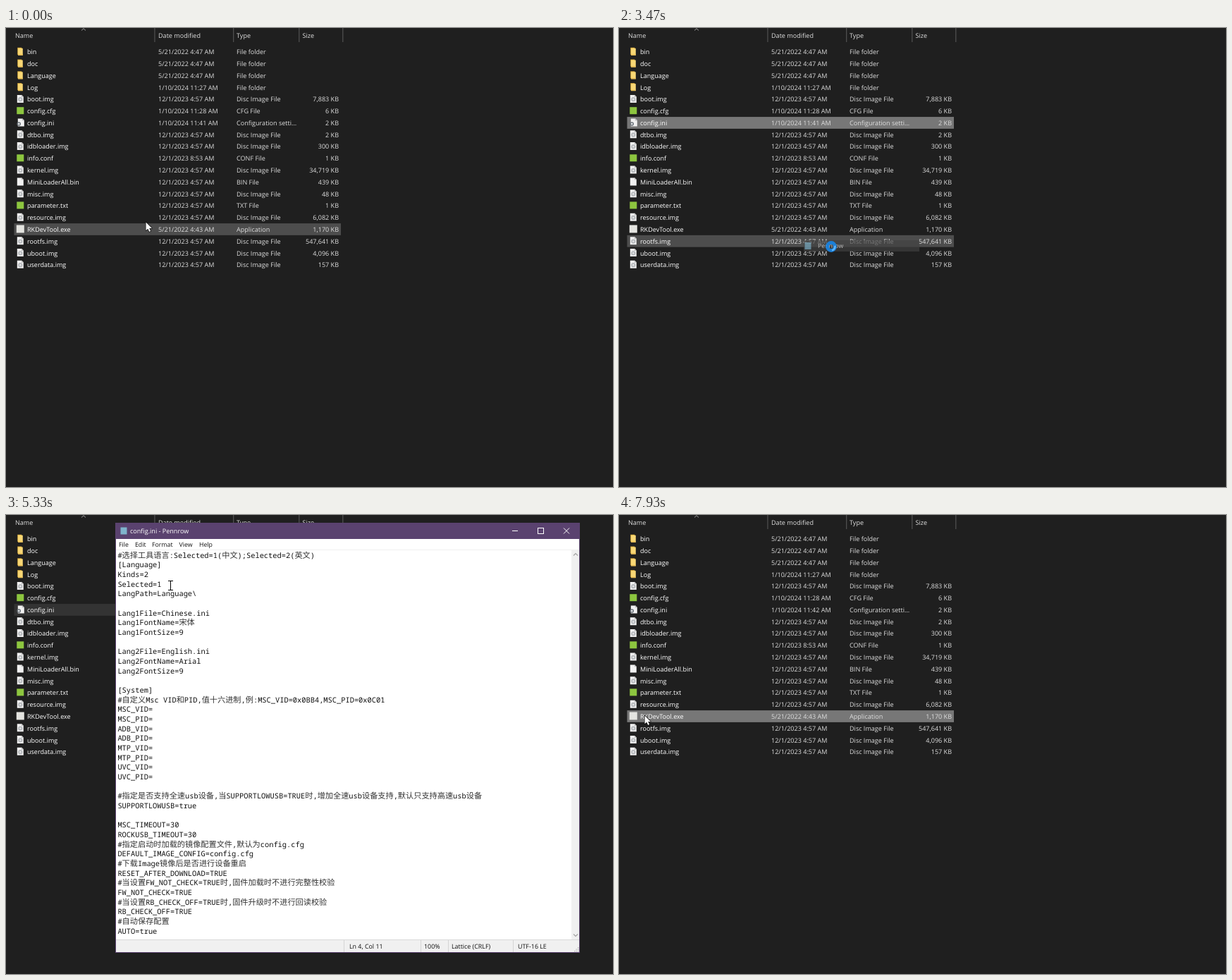
Animation, 861 px wide and 651 px high, one loop 8 s. Source, as an HTML page with a canvas:

```html
<!DOCTYPE html>
<html lang="en">
<head>
<meta charset="utf-8">
<title>Editing config.ini</title>
<style>
html, body { margin: 0; width: 100%; height: 100%; overflow: hidden; background: #1f1f1f; }
canvas { display: block; }
</style>
</head>
<body>
<canvas id="stage" width="861" height="651"></canvas>
<script>
const ctx = document.getElementById('stage').getContext('2d');
const UI = '"Open Sans", "Noto Sans", sans-serif';
const MONO = '"Noto Sans Mono", "DejaVu Sans Mono", monospace';
const CJK = '"Noto Sans CJK SC", "Noto Sans CJK", sans-serif';
const LOOP = 8000, FPS = 15;
const ROW_TOP = 25.4, ROW_H = 16.78, CONFIG = 6, TOOL = 15;
const WIN = { x: 155, y: 11, w: 659, h: 610 };

// name | type | size | icon | date (default: BUILD)
const BUILD = '12/1/2023 4:57 AM', SETUP = '5/21/2022 4:47 AM';
const FILES = `bin|File folder||folder|${SETUP}
doc|File folder||folder|${SETUP}
Language|File folder||folder|${SETUP}
Log|File folder||folder|1/10/2024 11:27 AM
boot.img|Disc Image File|7,883 KB|disc
config.cfg|CFG File|6 KB|note|1/10/2024 11:28 AM
config.ini|Configuration setti...|2 KB|gear|1/10/2024 11:41 AM
dtbo.img|Disc Image File|2 KB|disc
idbloader.img|Disc Image File|300 KB|disc
info.conf|CONF File|1 KB|note|12/1/2023 8:53 AM
kernel.img|Disc Image File|34,719 KB|disc
MiniLoaderAll.bin|BIN File|439 KB|page
misc.img|Disc Image File|48 KB|disc
parameter.txt|TXT File|1 KB|note
resource.img|Disc Image File|6,082 KB|disc
RKDevTool.exe|Application|1,170 KB|tool|5/21/2022 4:43 AM
rootfs.img|Disc Image File|547,641 KB|disc
uboot.img|Disc Image File|4,096 KB|disc
userdata.img|Disc Image File|157 KB|disc`.split('\n').map(s => s.split('|'));

// label | centre y | icon | has submenu
const MENU = `Open|145
Print|160
Edit|174.5
Shred with MossScrub|190|shred
4-Nib|205.5||1
Convert to Velmo PDF|225.5|pdf
Create and Share Velmo PDF|241.5|pdf
Edit with Pennrow++|261.5|note
Scan with Tarnovell Watchman...|277.5|guard
Share|293|share
Open with|308.5||1
What's using this file?|324|lock
Scan with Gremlinsweep|340|scan
BulkRetitle|356|retitle
Restore previous versions|371.5
Send to|391||1
Cut|410
Copy|425
Create shortcut|444
Delete|459
Rename|474
Properties|493`.split('\n').map(s => s.split('|'));
const MENU_LINES = [215, 251.5, 380.5, 400, 434, 483.5];
const SUBMENU = [['Pennrow', 309], ['Pennrow++', 325], ['Search the Tarnovell Store', 345], ['Choose another app', 360]];

const TEXT = String.raw`#选择工具语言:Selected=1(中文);Selected=2(英文)
[Language]
Kinds=2
Selected=
LangPath=Language\

Lang1File=Chinese.ini
Lang1FontName=宋体
Lang1FontSize=9

Lang2File=English.ini
Lang2FontName=Arial
Lang2FontSize=9

[System]
#自定义Msc VID和PID,值十六进制,例:MSC_VID=0x0BB4,MSC_PID=0x0C01
MSC_VID=
MSC_PID=
ADB_VID=
ADB_PID=
MTP_VID=
MTP_PID=
UVC_VID=
UVC_PID=

#指定是否支持全速usb设备,当SUPPORTLOWUSB=TRUE时,增加全速usb设备支持,默认只支持高速usb设备
SUPPORTLOWUSB=true

MSC_TIMEOUT=30
ROCKUSB_TIMEOUT=30
#指定启动时加载的镜像配置文件,默认为config.cfg
DEFAULT_IMAGE_CONFIG=config.cfg
#下载Image镜像后是否进行设备重启
RESET_AFTER_DOWNLOAD=TRUE
#当设置FW_NOT_CHECK=TRUE时,固件加载时不进行完整性校验
FW_NOT_CHECK=TRUE
#当设置RB_CHECK_OFF=TRUE时,固件升级时不进行回读校验
RB_CHECK_OFF=TRUE
#自动保存配置
AUTO=true`.split('\n');

// pointer path: step, x, y
const PATH = [
  [-1, 199, 281], [0, 198, 275], [3, 168, 238], [7, 88, 146], [10, 74, 135], [18, 74, 135],
  [21, 100, 190], [27, 168, 325], [30, 174, 351], [32, 177, 322], [34, 180, 312], [42, 244, 309],
  [46, 294, 322], [48, 301, 310], [52, 301, 310], [56, 266, 249], [60, 238, 150], [63, 229, 114],
  [66, 229, 98], [73, 229, 98], [74, 233, 99], [87, 233, 99], [91, 520, 60], [95, 764, 27],
  [97, 764, 27], [101, 790, 20], [102, 790, 20], [105, 561, 124], [110, 180, 262],
  [115, 36, 283], [116, 36, 284], [120, 36, 284]
];

function pointer(k) {
  const i = Math.max(1, PATH.findIndex(p => p[0] >= k));
  const [a, ax, ay] = PATH[i - 1], [b, bx, by] = PATH[i];
  const f = (k - a) / (b - a);
  return { x: Math.round(ax + (bx - ax) * f), y: Math.round(ay + (by - ay) * f) };
}

function rect(x, y, w, h, color) {
  ctx.fillStyle = color;
  ctx.fillRect(x, y, w, h);
}

function frame(x, y, w, h, color) {
  ctx.strokeStyle = color;
  ctx.lineWidth = 1;
  ctx.strokeRect(x + .5, y + .5, w - 1, h - 1);
}

function line(color, width, ...pts) {
  ctx.strokeStyle = color;
  ctx.lineWidth = width;
  ctx.beginPath();
  for (let i = 0; i < pts.length; i += 2) ctx.lineTo(pts[i], pts[i + 1]);
  ctx.stroke();
}

function dot(x, y, r, color) {
  ctx.fillStyle = color;
  ctx.beginPath();
  ctx.arc(x, y, r, 0, 7);
  ctx.fill();
}

function ring(x, y, r, width, color, from = 0, to = 7) {
  ctx.strokeStyle = color;
  ctx.lineWidth = width;
  ctx.beginPath();
  ctx.arc(x, y, r, from, to);
  ctx.stroke();
}

// y is the middle of the capitals
function label(s, x, y, size, color, align = 'left', weight = 400) {
  ctx.font = `${weight} ${size}px ${UI}`;
  ctx.textAlign = align;
  ctx.fillStyle = color;
  ctx.fillText(s, x, y + size * .36);
}

function chevron(x, y, color) {
  line(color, 1, x - 1.5, y - 3, x + 1.5, y, x - 1.5, y + 3);
}

function page(x, y) {
  ctx.fillStyle = '#f1f1f1';
  ctx.beginPath();
  ctx.moveTo(x - 4.5, y - 5.5);
  ctx.lineTo(x + 2, y - 5.5);
  ctx.lineTo(x + 4.5, y - 3);
  ctx.lineTo(x + 4.5, y + 5.5);
  ctx.lineTo(x - 4.5, y + 5.5);
  ctx.fill();
  line('#a9a9a9', .8, x + 2, y - 5.5, x + 2, y - 3, x + 4.5, y - 3);
}

const ICONS = {
  folder(x, y) {
    rect(x - 4, y - 5.5, 6, 10, '#e2b23f');
    rect(x - 3.2, y - 4.5, 6.7, 10, '#f8d775');
    rect(x - 3.2, y + 4, 6.7, 1.5, '#e9bd55');
  },
  page,
  disc(x, y) {
    page(x, y);
    dot(x, y + .8, 3.2, '#b9bcbf');
    dot(x, y + .8, 1.1, '#f4f4f4');
  },
  gear(x, y) {
    page(x + 1, y);
    ring(x - 2, y + 2, 2, 1.5, '#6d757c');
  },
  note: (x, y) => rect(x - 5, y - 5, 10, 10, '#8dc63f'),
  tool: (x, y) => rect(x - 5.5, y - 5.5, 11, 11, '#e4e4e0'),
  shred: (x, y) => dot(x, y, 5, '#d8b65a'),
  pdf: (x, y) => rect(x - 4, y - 4.5, 8, 9, '#d9433f'),
  guard: (x, y) => rect(x - 5.5, y - 5.5, 11, 11, '#1581d8'),
  scan: (x, y) => dot(x, y, 5, '#1c62c8'),
  retitle: (x, y) => rect(x - 4.5, y - 4.5, 9, 9, '#1b86d6'),
  share(x, y) {
    line('#e6e6e6', 1, x - 2, y - 2.5, x - 4.5, y - 2.5, x - 4.5, y + 4.5, x + 3.5, y + 4.5, x + 3.5, y + 2);
    line('#e6e6e6', 1, x - 2, y + 2, x - 1, y - 1, x + 1.5, y - 2, x + 1.5, y - 4.5, x + 5, y - 1, x + 1.5, y + 2, x + 1.5, y);
  },
  lock(x, y) {
    ring(x, y - 2, 2.5, 1.3, '#b9b9b9', Math.PI, 6.28);
    rect(x - 4, y - 1, 8, 6, '#c9a24a');
    rect(x - .5, y + 1, 1, 2, '#4b3a18');
  },
  app: (x, y) => rect(x - 4.5, y - 5, 9, 10, '#7fb4cc')
};

function drawList(k) {
  const head = '#dedede';
  label('Name', 13, 10.5, 9.05, head);
  label('Date modified', 216, 10.5, 9.05, head);
  label('Type', 327, 10.5, 9.05, head);
  label('Size', 420.5, 10.5, 9.05, head);
  for (const x of [210.5, 322.3, 415.4, 477.4]) rect(x, 0, .9, 20, '#636363');
  line('#9a9a9a', 1, 107, 3.5, 110, .8, 113, 3.5);

  const focused = k < 53 || k >= 104;
  const selected = k < 13 ? -1 : k < 114 ? CONFIG : TOOL;
  const p = pointer(k - 1);
  const free = k < 18 || k === 51 || k === 52 || k >= 105;
  const hover = free && p.x > 11 && p.x < 475 ? Math.floor((p.y - ROW_TOP) / ROW_H) : -1;

  FILES.forEach(([name, type, size, icon, date = BUILD], i) => {
    const top = ROW_TOP + ROW_H * i, mid = 34 + ROW_H * i;
    if (i === selected) rect(11.5, top, 463.5, ROW_H, focused ? '#777777' : '#333333');
    else if (i === hover) rect(11.5, top, 463.5, ROW_H, '#4d4d4d');
    ICONS[icon](20.3, mid - .7);
    if (i === CONFIG && k >= 109) date = date.replace(':41', ':42');
    label(name, 30, mid, 9.05, '#fff');
    label(date, 216, mid, 9.05, '#dedede');
    label(type, 327, mid, 9.05, '#dedede');
    label(size, 472, mid, 9.05, '#dedede', 'right');
  });
}

function panel(x, y, w, h) {
  rect(x - 1, y - .5, w + 2, h + 1, 'rgba(0,0,0,.2)');
  rect(x, y, w, h, '#2b2b2b');
  frame(x, y, w, h, '#858585');
}

function drawMenu(k) {
  const p = pointer(k), inSub = k >= 44;
  ctx.globalAlpha = k === 18 ? .6 : 1;
  panel(74, 135, 188, 367);
  MENU.forEach(([text, ys, icon, sub], i) => {
    const y = +ys;
    const lit = inSub ? text === 'Open with' : Math.abs(p.y - y) <= 7.8 && p.x > 76;
    if (lit) rect(76, Math.round(y - 7.7), 184, 15.5, '#414141');
    if (icon) ICONS[icon](84, y);
    label(text, 98, y, 8.75, '#fff', 'left', i ? 400 : 700);
    if (sub) chevron(252, y - .5, '#d0d0d0');
  });
  for (const y of MENU_LINES) rect(96, y - .5, 164, .9, '#808080');
  if (k >= 41) {
    ctx.globalAlpha = k === 41 ? .6 : 1;
    panel(260, 299, 168, 70);
    SUBMENU.forEach(([text, y], i) => {
      if (inSub && Math.abs(p.y - y) < 8) rect(262, y - 8, 164, 16, '#414141');
      if (i < 2) ICONS[i ? 'note' : 'app'](268, y);
      label(text, 282, y, 8.75, '#fff');
    });
    rect(280, 335, 146, .9, '#808080');
  }
  ctx.globalAlpha = 1;
}

// the chosen item fades after the menu has closed
function drawChosen(k) {
  ctx.globalAlpha = k === 51 ? .85 : .65;
  rect(262, 301, 164, 16, '#414141');
  ICONS.app(268, 309);
  label('Pennrow', 282, 309, 8.75, '#fff');
  ctx.globalAlpha = 1;
}

function codeLine(s, x, y) {
  ctx.textAlign = 'left';
  for (const run of s.match(/[\u4e00-\u9fff]+|[^\u4e00-\u9fff]+/g) || []) {
    const han = run > '\u4e00';
    ctx.font = han ? `300 11.18px ${CJK}` : `10.37px ${MONO}`;
    ctx.fillStyle = han ? '#333' : '#111';
    ctx.fillText(run, x, y + 3.8);
    x += ctx.measureText(run).width;
  }
  return x;
}

function drawButtons(k) {
  const p = pointer(k), over = p.y < 34 && k > 90;
  if (over && p.x >= 778) rect(778, 11, 36, 23, '#b2233f');
  else if (over && p.x >= 742) rect(742, 11, 36, 23, '#725e88');
  rect(718, 22, 8, 1, '#fff');
  frame(754, 18, 9, 9, '#fff');
  line('#fff', 1, 791, 18.5, 799, 26.5);
  line('#fff', 1, 799, 18.5, 791, 26.5);
}

function drawWindow(k) {
  const show = k < 56 ? [.3, .65, .9][k - 53] : k > 102 ? [.5, .15][k - 103] : 1;
  const scale = .9 + .1 * show;
  const cx = WIN.x + WIN.w / 2, cy = WIN.y + WIN.h / 2;
  ctx.save();
  ctx.globalAlpha = show;
  ctx.translate(cx, cy);
  ctx.scale(scale, scale);
  ctx.translate(-cx, -cy);

  rect(WIN.x, WIN.y, WIN.w, WIN.h, '#5a426f');
  rect(156, 34, 657, 586, '#fff');
  ICONS.app(167, 22.5);
  const dirty = k >= 81 && k < 89;
  label((dirty ? '*' : '') + 'config.ini - Pennrow', 176, 22.5, 9.05, '#fff');
  drawButtons(k);

  const menus = { File: 160, Edit: 183, Format: 207, View: 245.5, Help: 274 };
  for (const name in menus) label(name, menus[name], 42, 8.75, '#111');
  rect(156, 49, 657, 1, '#f0f0f0');

  rect(802, 50, 11, 552, '#f0f0f0');
  line('#a3a3a3', 1.2, 805, 57.5, 808, 54.5, 811, 57.5);
  line('#a3a3a3', 1.2, 805, 594.5, 808, 597.5, 811, 594.5);

  const typed = k < 81 ? '1' : k < 82 ? '' : '2';
  const caretLine = k < 71 ? 0 : 3;
  const caretOn = !(k >= 61 && k < 69) && k !== 80 && k < 98;
  TEXT.forEach((s, i) => {
    const y = 57 + 13.667 * i;
    const end = codeLine(i === 3 ? s + typed : s, 158.4, y);
    if (caretOn && i === caretLine) rect(i ? Math.round(end) : 158, Math.round(y - 6), 1, 13, '#000');
  });

  rect(156, 602, 657, 18, '#f0f0f0');
  rect(156, 602, 657, 1, '#d9d9d9');
  for (const x of [479, 588, 627, 719]) rect(x, 603, 1, 17, '#d5d5d5');
  const spot = caretLine ? `Ln 4, Col ${10 + typed.length}` : 'Ln 1, Col 1';
  label(spot, 487, 612, 8.9, '#111');
  label('100%', 593, 612, 8.9, '#111');
  label('Lattice (CRLF)', 632, 612, 8.9, '#111');
  label('UTF-16 LE', 726, 612, 8.9, '#111');
  for (let i = 0; i < 3; i++)
    for (let j = 0; j <= i; j++) rect(811 - j * 2.5, 613 + i * 2.5, 1.3, 1.3, '#b0b0b0');
  ctx.restore();
}

function busy(x, y, r, k) {
  ring(x, y, r * .68, r * .62, '#1c7fd6');
  ring(x, y, r * .68, r * .3, '#5fb8ff', k * .6, k * .6 + 1.6);
}

function arrow(x, y) {
  ctx.beginPath();
  [[0, 0], [0, 11.8], [2.8, 9.2], [4.7, 13.4], [6.6, 12.6], [4.8, 8.5], [8.5, 8.5]]
    .forEach(([dx, dy]) => ctx.lineTo(x + .5 + dx, y + .5 + dy));
  ctx.closePath();
  ctx.lineJoin = 'round';
  ctx.strokeStyle = '#000';
  ctx.lineWidth = 1.2;
  ctx.stroke();
  ctx.fillStyle = '#fff';
  ctx.fill();
  ctx.lineJoin = 'miter';
}

function beam(x, y) {
  rect(x, y - 6, 1, 13, '#000');
  rect(x - 3, y - 6, 7, 1, '#000');
  rect(x - 3, y + 7, 7, 1, '#000');
}

function drawPointer(k) {
  const { x, y } = pointer(k);
  if (k >= 51 && k < 56) return busy(x, y, 8, k);
  if (k >= 81 && k < 88) return;
  if (k >= 56 && k < 103 && y > 50) return beam(x, y);
  arrow(x, y);
  if (k === 118) busy(x + 14, y + 2, 5.5, k);
}

function draw(now) {
  const k = Math.floor(((now % LOOP) + 4) * FPS / 1000) % (LOOP * FPS / 1000);
  ctx.textRendering = 'geometricPrecision';
  rect(0, 0, 861, 651, '#1f1f1f');
  drawList(k);
  if (k >= 18 && k < 51) drawMenu(k);
  if (k === 51 || k === 52) drawChosen(k);
  if (k >= 53 && k < 105) drawWindow(k);
  drawPointer(k);
}

function tick() {
  draw(performance.now());
  requestAnimationFrame(tick);
}
tick();
</script>
</body>
</html>
```
